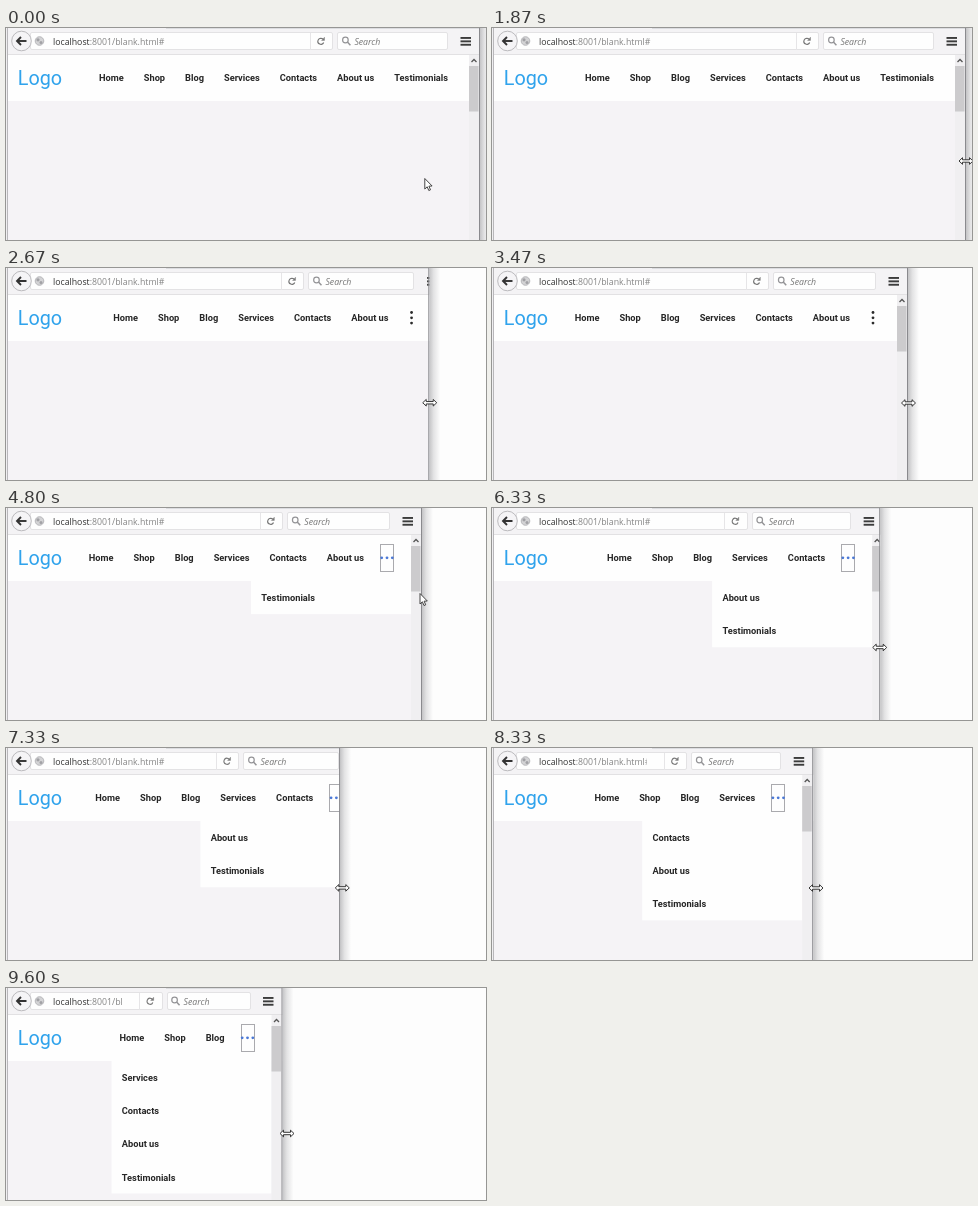
These frames come from a looping animation (480 by 212 pixels, 9.74 s). An HTML page with a canvas:

```html
<!DOCTYPE html>
<html lang="en">
<head>
<meta charset="utf-8">
<title>Responsive menu</title>
<style>
  html, body { margin: 0; width: 100%; height: 100%; overflow: hidden; background: #fdfdfd; }
  canvas { display: block; }
</style>
</head>
<body>
<canvas id="stage" width="480" height="212"></canvas>
<script>
const ctx = document.getElementById('stage').getContext('2d');
const LOOP = 9740, STEP = 200 / 3, LAG = 100, CLICK = 4320;
const ITEMS = ['Home', 'Shop', 'Blog', 'Services', 'Contacts', 'About us', 'Testimonials'];
const GAP = 20, MIN_LEFT = 81, ROW = 33.1;
const UI = '8.75px "Open Sans", "Noto Sans", sans-serif';
const BOLD = 'bold 9.25px Roboto, sans-serif';

// Pointer moves; a drag also carries the window's right edge along.
const START = { x: 418.3, y: 150, edge: 474 };
const MOVES = [
  { from: 0, to: 470, x: 466, y: 134 },
  { from: 600, to: 1200, x: 474, y: 133 },
  { from: 2467, to: 2867, x: 416.5, y: 135, edge: 416 },
  { from: 3480, to: 3800, x: 380, y: 50 },
  { from: 4500, to: 4800, x: 413.5, y: 85 },
  { from: 4800, to: 5200, x: 416, y: 138 },
  { from: 6000, to: 6470, x: 387, y: 139.5, edge: 387.5 },
  { from: 6930, to: 7070, x: 382, y: 139.5, edge: 382 },
  { from: 7200, to: 7530, x: 324, y: 140, edge: 321.2 },
  { from: 8730, to: 9000, x: 281, y: 145.5, edge: 276.5 },
];

const ramp = (t, from, to) => Math.max(0, Math.min(1, (t - from) / (to - from)));
const easeOut = u => 1 - (1 - u) ** 3;

function valueAt(name, t) {
  return MOVES.reduce((value, move) =>
    value + ((move[name] ?? value) - value) * easeOut(ramp(t, move.from, move.to)), START[name]);
}

function rect(x, y, w, h, fill) {
  ctx.fillStyle = fill;
  ctx.fillRect(x, y, w, h);
}

function text(str, x, y, font, fill) {
  ctx.font = font;
  ctx.fillStyle = fill;
  ctx.fillText(str, x, y);
  return x + ctx.measureText(str).width;
}

function paint(fill, stroke, width) {
  if (fill) { ctx.fillStyle = fill; ctx.fill(); }
  if (stroke) { ctx.strokeStyle = stroke; ctx.lineWidth = width; ctx.stroke(); }
}

function path(points, stroke, width, fill) {
  ctx.beginPath();
  points.forEach(([x, y]) => ctx.lineTo(x, y));
  if (fill) ctx.closePath();
  paint(fill, stroke, width);
}

function circle(x, y, r, fill, stroke, width = 1, from = 0, to = Math.PI * 2) {
  ctx.beginPath();
  ctx.arc(x, y, r, from, to);
  paint(fill, stroke, width);
}

function clipped(x, w, drawInside) {
  ctx.save();
  ctx.beginPath();
  ctx.rect(x, 0, w, 212);
  ctx.clip();
  drawInside();
  ctx.restore();
}

function field(x, right) {
  ctx.beginPath();
  ctx.roundRect(Math.round(x) + .5, 4.5, Math.round(right - x), 17, 1.5);
  paint('#fefefe', '#e3e2e4', 1);
}

function toolbar(right) {
  const searchRight = right - 33;
  const search = searchRight - 83 - (right - 277) * .135;
  const reload = search - 16.5;

  rect(0, 0, 480, 27, '#f4f3f5');
  rect(160, 0, 320, 1, '#dcdde0');
  rect(0, 26, 480, 1, '#e2e1e3');

  field(24, search - 5);
  circle(15.5, 13, 9.8, '#f5f4f6', '#bbbabd');
  path([[20.5, 13], [11.5, 13]], '#333', 1.9);
  path([[15, 9], [11, 13], [15, 17]], '#333', 1.9);

  circle(33.5, 13, 4.3, '#d3d3d5', '#b3b3b6', .9);
  circle(32, 11.8, 1.6, '#a2a2a6');
  circle(35, 14.6, 1.5, '#a2a2a6');

  clipped(40, reload - 68, () => {
    const hostEnd = text('localhost', 47, 17, UI, '#333');
    text(':8001/blank.html#', hostEnd, 17, UI, '#858585');
  });

  rect(Math.round(reload - 11), 5, 1, 17, '#e6e5e7');
  circle(reload, 13.3, 3, null, '#777', 1.2, .4, 5.4);
  path([[reload + 3.6, 9.2], [reload + 3.6, 12.4], [reload + .6, 12.4]], '#777', .4, '#777');

  field(search, searchRight);
  circle(search + 8, 12, 2.8, null, '#949497', 1.2);
  path([[search + 10, 14], [search + 13, 17.2]], '#949497', 1.5);
  text('Search', search + 17, 17, 'italic ' + UI, '#777');

  for (let i = 0; i < 3; i++) rect(right - 19.5, 9 + i * 3.4, 10.5, 1.9, '#3c3c3c');
}

function menuButton(x, turn) {
  ctx.save();
  ctx.translate(x, 49.8);
  if (turn > 0) {
    ctx.strokeStyle = '#aaaaae';
    ctx.lineWidth = 1;
    ctx.strokeRect(Math.round(x - 7) + .5 - x, -13.3, 13, 27);
  }
  ctx.rotate(turn * Math.PI / 2);
  for (let i = -1; i <= 1; i++) circle(0, i * 5.3, 1.4, turn > 0 ? '#4a78d6' : '#2b2b2b');
  ctx.restore();
}

function dropdown(items, side, opacity) {
  ctx.save();
  ctx.globalAlpha = opacity;
  rect(side - 160, 73, 160, items.length * ROW, '#fefefe');
  items.forEach((item, i) => text(item, side - 149.7, 93.2 + i * ROW, BOLD, '#262626'));
  ctx.restore();
}

function page(right, t) {
  const side = right - 11;
  ctx.font = BOLD;
  const widths = ITEMS.map(item => ctx.measureText(item).width);
  const leftFor = n => widths.slice(0, n).reduce((x, w) => x - w - GAP,
    side + GAP - (n < ITEMS.length ? 47 : 21));
  let shown = ITEMS.length;
  while (leftFor(shown) < MIN_LEFT) shown--;

  rect(0, 27, 480, 185, '#f5f3f6');
  rect(0, 27, 480, 46, '#fefefe');
  text('Logo', 11.8, 57, '19.8px Roboto, sans-serif', '#30a3ec');
  ITEMS.slice(0, shown).reduce((x, item) =>
    text(item, x, 53.2, BOLD, '#262626') + GAP, leftFor(shown));

  if (shown < ITEMS.length) {
    menuButton(side - 24, ramp(t, CLICK, CLICK + 250));
    dropdown(ITEMS.slice(shown), side, ramp(t, CLICK, CLICK + 200));
  }

  rect(side, 27, 20, 185, '#f0eff1');
  rect(side, 38, 9.5, 45.5, '#cccbcd');
  path([[side + 2.5, 34], [side + 5, 31.5], [side + 7.5, 34]], '#555', 1.3);
}

function pointer(x, y, resizing) {
  ctx.save();
  ctx.translate(x, y);
  if (resizing) {
    const half = [[-7, 0], [-3.5, -3.3], [-3.5, -1.2], [3.5, -1.2], [3.5, -3.3], [7, 0]];
    const mirrored = half.slice(1, -1).reverse().map(([px, py]) => [px, -py]);
    path([...half, ...mirrored], '#222', .9, '#fff');
  } else {
    path([[.5, .5], [.5, 11], [2.9, 8.8], [4.5, 12.5], [6.2, 11.8], [4.6, 8.2], [7.8, 8]],
      '#333', .9, '#fff');
  }
  ctx.restore();
}

function draw(t) {
  const edge = valueAt('edge', t);
  const content = valueAt('edge', t - LAG);

  rect(0, 0, 480, 212, '#fdfdfd');
  const shadow = ctx.createLinearGradient(edge, 0, edge + 11, 0);
  shadow.addColorStop(0, '#c4c4c6');
  shadow.addColorStop(.4, '#e3e3e4');
  shadow.addColorStop(1, '#fdfdfd');
  rect(edge, 0, 11, 212, shadow);

  clipped(0, edge, () => {
    page(content, t);
    toolbar(content);
  });

  rect(0, 0, 1, 212, '#f0eff1');
  rect(1, 0, 1, 212, '#b8b7ba');
  rect(edge - 1, 0, 1, 212, '#8a8a8e');

  const resizing = (t > 1000 && t < 3530) || t > 5060;
  pointer(valueAt('x', t), valueAt('y', t), resizing);
}

function tick() {
  const t = performance.now() % LOOP;
  draw(Math.floor((t + 5) / STEP) * STEP);
  requestAnimationFrame(tick);
}
tick();
</script>
</body>
</html>
```
